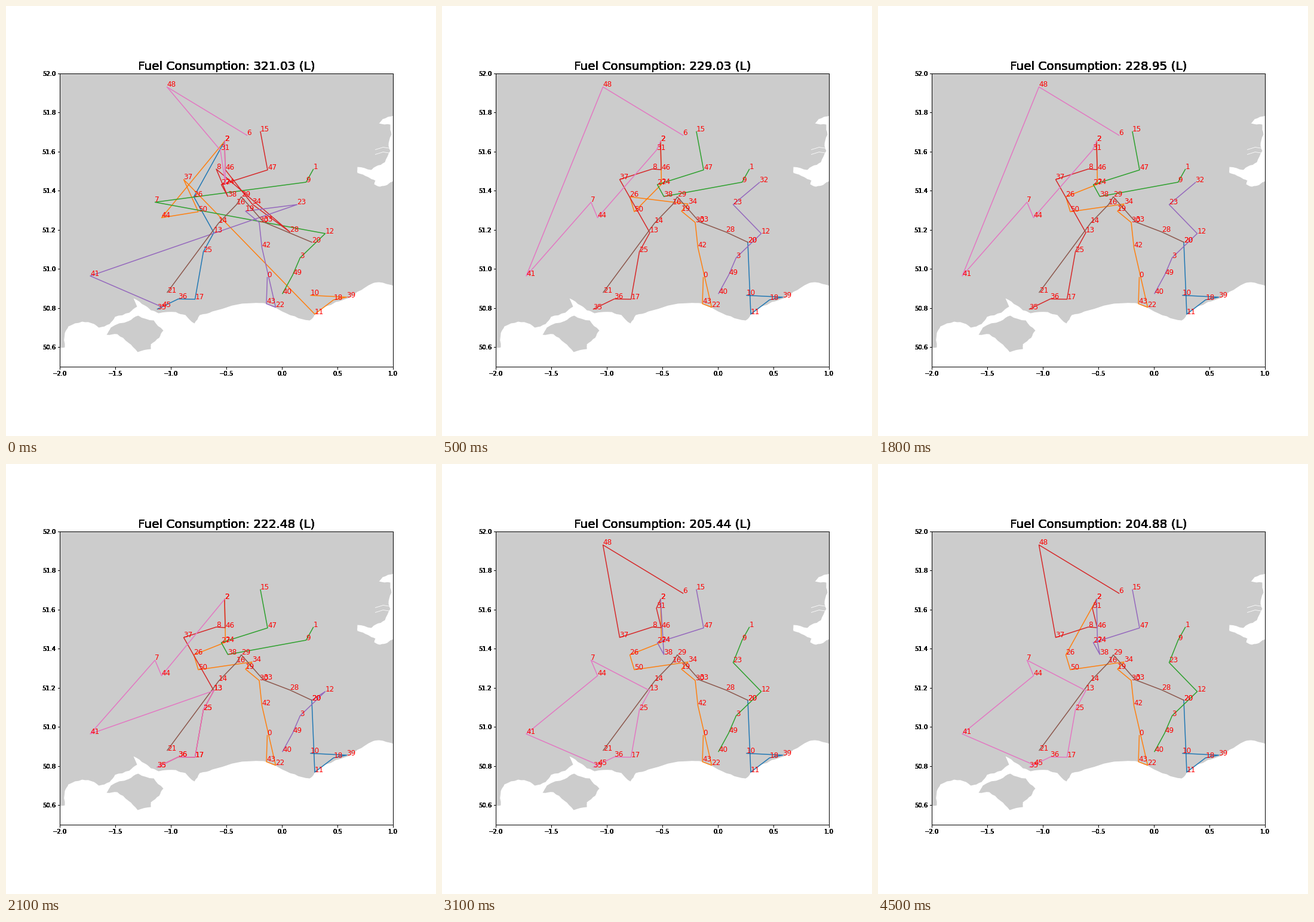
Recreate the animation shown at these times as a matplotlib script. Size 720x720 px, loop 5000 ms.

```python
import random

import matplotlib.pyplot as plt
from matplotlib.animation import FuncAnimation
from matplotlib.patches import Polygon

plt.rcParams["font.family"] = "DejaVu Sans"

FRAMES, STEP = 50, 100
LEFT, RIGHT, TOP, BOTTOM, SIZE = 90, 648, 112.7, 603.7, 720
BOX = [LEFT / SIZE, 1 - BOTTOM / SIZE, (RIGHT - LEFT) / SIZE, (BOTTOM - TOP) / SIZE]
INK_LAYERS = 10         # repeated passes give the hard, heavy axis lettering

# Delivery stops in stage pixels
STOPS = {
    0: (437, 454), 1: (514, 273), 2: (365.5, 226), 3: (492, 421), 6: (403, 216),
    7: (249, 328), 8: (351.5, 272.5), 9: (502, 294.5), 10: (509.5, 484),
    11: (516.5, 515.5), 12: (534, 380.5), 13: (347.5, 379), 14: (355.5, 363),
    15: (425.5, 210), 16: (385.5, 332), 17: (316, 490.5), 18: (548, 491.5),
    19: (400.5, 343), 20: (511.5, 395), 21: (269.5, 479), 22: (451, 504),
    23: (487, 332), 24: (367, 298), 25: (330, 411), 26: (314, 319),
    27: (360, 298.5), 28: (475, 378), 29: (393.5, 319), 30: (423.5, 362),
    31: (358.5, 241), 32: (531, 295), 33: (430.5, 361), 34: (411.5, 331),
    35: (253, 507), 36: (288, 490), 37: (297, 290), 38: (371, 318.5),
    39: (570, 487), 40: (462.5, 481), 41: (140.5, 451.5), 42: (428, 404),
    43: (435.5, 498), 44: (260, 354), 45: (261, 503.5), 46: (366.5, 273.5),
    47: (437.5, 274), 48: (269, 135), 49: (479.5, 450), 50: (321.5, 344),
}

# Headlands and bays; the shore between them is roughened
SOUTH = [
    (89, 573), (98, 571), (98, 547), (104, 536), (127, 528), (147, 532),
    (155, 538), (173, 532), (182, 520), (206, 513), (219, 503), (213, 489),
    (232, 501), (242, 509), (255, 514), (284, 512), (300, 517), (315, 531),
    (324, 517), (345, 511), (412, 497), (436, 498), (455, 507), (483, 519),
    (508, 526), (519, 514), (552, 495), (572, 489), (588, 478), (613, 464),
    (624, 462), (649, 468),
]
EAST = [
    (649, 292), (638, 299), (626, 302), (616, 298), (618, 292), (606, 286),
    (588, 279), (588, 269), (611, 274), (619, 268), (634, 261), (643, 242),
    (640, 234), (645, 215), (643, 198), (624, 196), (630, 189), (649, 183),
]
ISLAND = [
    (168, 550), (175, 538), (205, 527), (221, 518), (247, 526), (263, 543),
    (256, 555), (242, 566), (242, 574), (220, 579), (204, 563), (186, 549),
]

# Routes shared by several plans
SHORE = "10 39 18 11 20"
INLAND = "21 14 16 29 33 28 20"
SOUTHWEST = "35 36 17 25 13 37 8 46 2"
WEST = "6 48 41 7 44 31 2"
WEALD = "40 49 3 12 23 32"
NORTH = "1 9 38 27 47 15"
EASTERN = "1 9 23 12 3 49 40"
STEM = "0 43 22 42 30 19"
MID = STEM + " 34 50 26 24 2"
NORTHWEST = "6 48 37 8 46 31 2"
LOOP = "35 36 17 25 13 7 44 41 45"

START = ["2 26 13 25 17 36 35", "2 44 50 37 11 18 39 10", "1 9 7 12 3 49 40",
         "15 47 27 38 8 28 34 46 2", STEM + " 23 41 45", "21 14 16 29 33 20",
         "6 48 31 24 2"]
ZIGZAG = [SHORE, STEM + " 34 26 50 24 2", NORTH, SOUTHWEST, WEALD, INLAND, WEST]
DIRECT = [SHORE, MID, NORTH, SOUTHWEST, WEALD, INLAND, WEST]
CENTRAL = ["15 47 27 38 34 50 26 24 2", SHORE, "1 9 19 30 42 22 43 0",
           SOUTHWEST, WEALD, INLAND, WEST]
REGROUPED = [SHORE, MID, "1 9 23 38 27 47 15", NORTHWEST, "40 49 3 12 20",
             INLAND, "35 36 17 25 13 41 7 44 2"]
COMPACT = [SHORE, MID, EASTERN, NORTHWEST, "15 47 27 38 2", INLAND, LOOP]
FINAL = [SHORE, STEM + " 34 50 26 2", EASTERN, NORTHWEST, "15 47 27 38 24 2",
         INLAND, LOOP]

# Key ticks: (fuel, plan)
KEYS = {
    0: (321.03, START), 5: (229.03, ZIGZAG), 9: (228.95, DIRECT),
    11: (228.5, CENTRAL), 15: (229.03, ZIGZAG), 16: (228.5, CENTRAL),
    18: (228.95, DIRECT), 25: (219.35, REGROUPED), 31: (205.44, COMPACT),
    45: (204.88, FINAL),
}
# Ticks at which the search finds a plan between two keys
BETWEEN = [1, 2, 3, 4, 19, 21, 22, 27, 30, 41, 44]
CHANGES = sorted([*KEYS, *BETWEEN])


def state_at(tick):
    """Fuel and plan; between keys, routes are replaced from the last one up."""
    now = max(t for t in CHANGES if t <= tick)
    if now in KEYS:
        return KEYS[now]
    before = max(t for t in KEYS if t < now)
    after = min(t for t in KEYS if t > now)
    (fuel0, old), (fuel1, new) = KEYS[before], KEYS[after]
    p = (now - before) / (after - before)
    kept = len(old) - round(p * len(old))
    eased = 1 - (1 - p) ** 2
    return round(fuel0 + (fuel1 - fuel0) * eased, 2), old[:kept] + new[kept:]


def roughen(points, rng, depth=2, amount=0.07):
    """Fractal shoreline: shift each midpoint sideways by a random bit."""
    for _ in range(depth):
        rough = [points[0]]
        for (x0, y0), (x1, y1) in zip(points, points[1:]):
            k = rng.uniform(-amount, amount)
            rough.append(((x0 + x1) / 2 - k * (y1 - y0),
                          (y0 + y1) / 2 + k * (x1 - x0)))
            rough.append((x1, y1))
        points = rough
    return points


fig = plt.figure(figsize=(10, 10), dpi=72, facecolor="white")

# Map layer in stage pixels, shifted to pixel centres
chart = fig.add_axes(BOX)
chart.set_axis_off()
chart.set_xlim(LEFT - 0.5, RIGHT - 0.5)
chart.set_ylim(BOTTOM - 0.5, TOP - 0.5)
rng = random.Random(4)
mainland = [(89, 112)] + roughen(SOUTH, rng) + roughen(EAST, rng) + [(649, 112)]
island = roughen(ISLAND + ISLAND[:1], rng)
for shore in (mainland, island):
    chart.add_patch(Polygon(shore, fc="0.8", ec="none"))
for y in (238, 246):
    chart.plot([644, 631, 618], [y, y - 2, y + 2], color="white", lw=0.8, zorder=1.5)


def add_frame():
    ax = fig.add_axes(BOX)
    ax.patch.set_visible(False)
    ax.set_xlim(-2, 1)
    ax.set_ylim(50.5, 52)
    ax.set_xticks([-2 + 0.5 * i for i in range(7)])
    ax.set_yticks([round(50.6 + 0.2 * i, 1) for i in range(8)])
    return ax.set_title("", fontsize=20, y=1)


titles = [add_frame() for _ in range(INK_LAYERS)]
drawn = []


def draw_route(route, color):
    stops = route.split()
    points = [STOPS[int(s)] for s in stops]
    drawn.extend(chart.plot(*zip(*points), color=color, lw=1.5))
    for stop, (x, y) in zip(stops, points):
        drawn.append(chart.text(x, y, stop, color="red", fontsize=12))


def update(tick):
    while drawn:
        drawn.pop().remove()
    fuel, plan = state_at(tick)
    for title in titles:
        title.set_text(f"Fuel Consumption: {fuel} (L)")
    for i, route in enumerate(plan):
        draw_route(route, f"C{i}")
    return drawn


anim = FuncAnimation(fig, update, frames=FRAMES, interval=STEP,
                     repeat=True, repeat_delay=0, blit=False)
plt.show()
```
